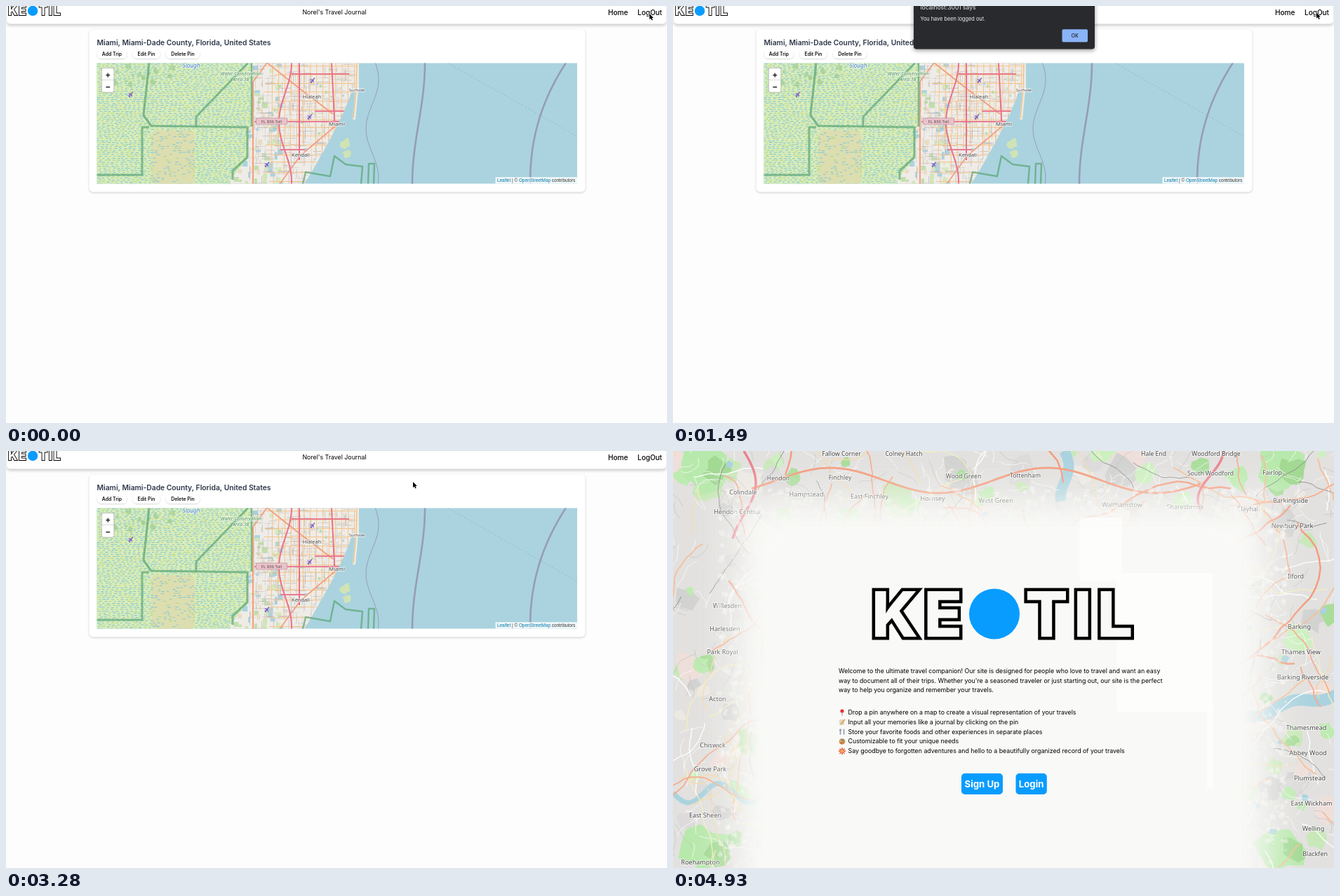
Recreate the animation shown at these times as an HTML page with a canvas. Size 942 by 595 pixels, loop 5.68 s.

```html
<!DOCTYPE html>
<html lang="en">
<head>
<meta charset="utf-8">
<title>Travel journal</title>
<style>
  html, body { margin: 0; width: 100%; height: 100%; overflow: hidden; background: #fdfdfd; }
  canvas { display: block; width: 942px; height: 595px; }
</style>
</head>
<body>
<canvas id="stage" width="942" height="595"></canvas>
<script>
const W = 942, H = 595, LOOP = 5680, STEP = 150;
const UI = 'Inter, sans-serif', MAP = '"Noto Sans", sans-serif';
const PAPER = '#f9f9f7', BLUE = '#089cff', WATER = '#aad3df';
const stage = document.getElementById('stage').getContext('2d');

function seeded(seed) {
  return () => {
    seed = (seed + 0x6d2b79f5) | 0;
    let t = Math.imul(seed ^ (seed >>> 15), 1 | seed);
    t = (t + Math.imul(t ^ (t >>> 7), 61 | t)) ^ t;
    return ((t ^ (t >>> 14)) >>> 0) / 4294967296;
  };
}

function repeat(n, draw) {
  for (let i = 0; i < n; i++) draw(i);
}

function layer(draw) {
  const c = document.createElement('canvas');
  c.width = W;
  c.height = H;
  draw(c.getContext('2d'));
  return c;
}

function text(g, str, x, y, font, color = '#000', align = 'left') {
  g.font = font;
  g.fillStyle = color;
  g.textAlign = align;
  g.fillText(str, x, y);
}

function label(g, str, x, y, size, color = '#444', style = '') {
  g.font = `${style} ${size}px ${MAP}`;
  g.textAlign = 'center';
  g.lineJoin = 'round';
  g.lineWidth = 2;
  g.strokeStyle = 'rgba(255,255,255,.65)';
  g.strokeText(str, x, y);
  text(g, str, x, y, g.font, color, 'center');
}

function box(g, x, y, w, h, r, fill) {
  g.beginPath();
  g.roundRect(x, y, w, h, r);
  g.fillStyle = fill;
  g.fill();
}

function shadowBox(g, blur, dy, alpha, ...shape) {
  g.save();
  g.shadowBlur = blur;
  g.shadowOffsetY = dy;
  g.shadowColor = `rgba(0,0,0,${alpha})`;
  box(g, ...shape);
  g.restore();
}

function trace(g, points) {
  g.beginPath();
  for (const [x, y] of points) g.lineTo(x, y);
}

function line(g, color, width, points) {
  trace(g, points);
  g.lineJoin = 'round';
  g.strokeStyle = color;
  g.lineWidth = width;
  g.stroke();
}

function area(g, color, points) {
  trace(g, points);
  g.fillStyle = color;
  g.fill();
}

function sample(n, point) {
  return Array.from({ length: n + 1 }, (_, i) => point(i / n));
}

// Points running down the stage, with x given as a function of y.
function downward(y0, y1, xAt) {
  return sample(40, u => {
    const y = y0 + (y1 - y0) * u;
    return [xAt(y), y];
  });
}

function disc(g, x, y, r, color) {
  g.beginPath();
  g.arc(x, y, r, 0, 7);
  g.fillStyle = color;
  g.fill();
}

function blob(g, rnd, x, y, r, color) {
  area(g, color, sample(10, u => {
    const a = u * 5.7, d = r * (0.6 + rnd() * 0.6);
    return [x + Math.cos(a) * d, y + Math.sin(a) * d];
  }));
}

function brand(g, x, y, scale, paper) {
  g.save();
  g.translate(x, y);
  g.scale(scale, scale);
  g.font = '800 90px ' + UI;
  g.letterSpacing = '8px';
  g.lineWidth = 9;
  g.strokeStyle = '#000';
  g.fillStyle = paper;
  for (const [part, left] of [['KE', -2], ['TIL', 217]]) {
    g.strokeText(part, left, -4.5);
    g.fillText(part, left, -4.5);
  }
  disc(g, 173, -37, 36, BLUE);
  g.restore();
}

function plane(g, x, y) {
  g.save();
  g.translate(x, y);
  g.rotate(0.7);
  g.fillStyle = '#8461c4';
  g.fillRect(-0.7, -4.5, 1.4, 9);
  area(g, '#8461c4', [[0, -1.5], [4, 1.5], [-4, 1.5]]);
  g.fillRect(-1.8, 3, 3.6, 1);
  g.restore();
}

function wetland(g, rnd) {
  g.fillStyle = '#daecb6';
  g.fillRect(129, 81, 243, 173);
  box(g, 207, 177, 62, 78, 8, '#dcdeb0');
  for (let y = 82; y < 254; y += 2.8) {
    for (let x = 129 + rnd() * 5; x < 352; x += 5 + rnd() * 3) {
      const dry = x > 207 && x < 269 && y > 177;
      if (dry && rnd() < 0.55) continue;
      g.fillStyle = rnd() < 0.8 ? '#7fc5d6' : '#aad588';
      g.fillRect(x, y + rnd(), 2.5 + rnd() * 2.5, 1);
    }
  }
  repeat(18, () => blob(g, rnd, 130 + rnd() * 120, 82 + rnd() * 30, 2 + rnd() * 3, 'rgba(158,204,142,.6)'));
}

const eastCoast = y => y < 122 ? 503 : 492 - 67 * ((y - 122) / 132) ** 1.2;
const westEdge = y => y < 172 ? 351 : 345 - Math.max(0, y - 216) * 0.8;

function city(g, rnd) {
  const speckle = (n, x, w, colors, size) => repeat(n, i => {
    g.fillStyle = colors[i % colors.length];
    g.fillRect(x + rnd() * w, 82 + rnd() * 170, size * (0.4 + rnd()), size * (0.4 + rnd()));
  });
  g.save();
  trace(g, [...downward(81, 254, eastCoast), ...downward(254, 81, westEdge)]);
  g.clip();
  g.fillStyle = '#efece8';
  g.fillRect(320, 81, 190, 173);
  speckle(90, 322, 50, ['#cfe6b5', '#e8ddc4', '#c2dfab', WATER], 6);
  speckle(40, 372, 16, [WATER, '#d9e8bd'], 6);
  repeat(420, i => {
    const x = 345 + rnd() * 153, y = 81 + rnd() * 173, length = 5 + rnd() * 18;
    g.fillStyle = i % 3 ? '#cdc8c6' : '#b5b1b0';
    if (i % 2) g.fillRect(x, y, length, 0.6);
    else g.fillRect(x, y, 0.6, length);
  });
  repeat(14, i => {
    const y = 85 + i * 12.5 + rnd() * 3, x = 380 + i * 9;
    line(g, '#f5c488', 1, [[367 + rnd() * 18, y], [500, y]]);
    line(g, '#f5c488', 1, [[x, 81], [x - 2, 170 + rnd() * 84]]);
  });
  speckle(40, 385, 105, ['#b7dca5', WATER], 3);

  const pink = '#e8718d', salmon = '#f2a17f';
  line(g, salmon, 2.2, downward(108, 254, () => 352));
  line(g, salmon, 2, [[372, 81], [420, 119], [466, 154]]);
  line(g, salmon, 2, [[372, 81], [352, 108]]);
  line(g, salmon, 1.8, [[471, 170], [420, 213], [390, 254]]);
  line(g, pink, 2, downward(81, 254, y => 398 + 9 * Math.cos((y - 81) / 27)));
  line(g, pink, 2, downward(81, 220, () => 418));
  line(g, pink, 2, downward(81, 165, y => 464 + (y - 81) / 20));
  for (const [x, y, width] of [[354, 165, 135], [407, 97, 82], [440, 150, 55], [391, 205, 35]]) {
    g.fillStyle = pink;
    g.fillRect(x, y - 0.9, width, 1.8);
  }
  g.restore();
  line(g, '#eeeadd', 4, [[501, 81], [500, 120], [496, 162]]);
  line(g, '#f3b878', 1.1, [[500, 81], [499, 120], [495, 160]]);
  blob(g, rnd, 484, 196, 8, '#cfe3b5');
  blob(g, rnd, 486, 211, 6, '#cfe3b5');
}

function seaLines(g) {
  const limit = '#979bb9';
  line(g, limit, 1, downward(81, 254, y => 522 + 9 * Math.cos((y - 105) / 22.3)));
  line(g, limit, 2.6, downward(81, 254, y => 588 + 9 * Math.cos((y - 81) / 55)));
  line(g, limit, 2.6, downward(81, 254, y => 747 + 51 * ((254 - y) / 173) ** 2.2));
  g.setLineDash([3, 2.5]);
  line(g, '#91b7d1', 0.8, [[629, 81], [814, 186]]);
  g.setLineDash([]);
}

function parkBorders(g) {
  const park = 'rgba(91,166,117,.7)';
  line(g, park, 3.2, [[204, 81], [196, 156], [207, 171], [344, 173], [344, 216], [323, 235], [323, 248]]);
  line(g, park, 3, [[129, 241], [194, 241], [194, 173], [204, 173]]);
  line(g, park, 2.8, [[345, 81], [271, 158], [271, 172]]);
  line(g, park, 2.5, [[350, 81], [350, 172]]);
  line(g, park, 2.5, [[423, 254], [427, 237], [462, 243], [468, 214], [484, 226], [508, 229], [506, 254]]);
  line(g, park, 2.5, [[516, 254], [517, 225], [525, 225], [524, 254]]);
}

function mapControls(g) {
  box(g, 136, 88, 18.2, 35.4, 2.3, '#a8aca8');
  box(g, 136.7, 88.7, 16.8, 34, 1.8, '#fff');
  g.fillStyle = '#ccc';
  g.fillRect(137, 105.2, 16.5, 0.7);
  text(g, '+', 145.2, 102.2, '600 12px ' + UI, '#111', 'center');
  text(g, '−', 145.2, 119.4, '600 12px ' + UI, '#111', 'center');

  g.fillStyle = 'rgba(255,255,255,.82)';
  g.fillRect(697.5, 244.2, 117, 10);
  let x = 700;
  for (const [part, color] of [['Leaflet', '#0078a8'], [' | © ', '#444'],
    ['OpenStreetMap', '#0078a8'], [' contributors', '#333']]) {
    text(g, part, x, 251.3, '6.4px "Liberation Sans", sans-serif', color);
    x += g.measureText(part).width;
  }
}

function miamiMap(g) {
  const rnd = seeded(21);
  g.save();
  g.beginPath();
  g.rect(129.5, 81.5, 684.5, 172);
  g.clip();
  g.fillStyle = WATER;
  g.fillRect(129, 81, 686, 174);
  wetland(g, rnd);
  city(g, rnd);
  parkBorders(g);
  seaLines(g);
  for (const [x, y] of [[178, 126], [437, 106], [433, 158], [372, 226]]) plane(g, x, y);
  box(g, 356, 159.7, 45, 9.6, 1.3, '#b88391');
  box(g, 356.6, 160.3, 43.8, 8.4, 1, '#e9c3ca');
  text(g, 'FL 836 Toll', 378.5, 166.7, '6px ' + MAP, '#5b3f48', 'center');
  label(g, 'Slough', 264, 88, 8.1, '#417fc1', 'italic');
  label(g, 'Water Conservation', 335, 99, 6.7, '#438943', 'italic');
  label(g, 'Area 3B', 335, 107, 6.7, '#438943', 'italic');
  label(g, 'Hialeah', 436, 131.5, 7.4);
  label(g, 'Miami', 471.5, 170.5, 7.9);
  label(g, 'Kendall', 420, 214.5, 7.4);
  label(g, 'Surfside', 500, 121.5, 5.8);
  mapControls(g);
  g.restore();
}

const journal = layer(g => {
  g.fillStyle = '#fdfdfd';
  g.fillRect(0, 0, W, H);
  shadowBox(g, 4, 2.5, 0.2, 1, -10, 940, 35.5, 5, '#fff');
  brand(g, 3.5, 14.3, 0.2, '#fff');
  text(g, "Norel's Travel Journal", 468, 12.4, '8.8px ' + UI, '#000', 'center');
  text(g, 'Home', 858, 12.8, '500 10.1px ' + UI);
  text(g, 'LogOut', 900, 12.8, '500 10px ' + UI);

  shadowBox(g, 3, 1, 0.2, 118.5, 33.5, 707, 232, 6, '#fff');
  text(g, 'Miami, Miami-Dade County, Florida, United States', 129.5, 56, '600 10.3px ' + UI, '#2d3748');
  for (const [name, x, w] of [['Add Trip', 129.5, 43], ['Edit Pin', 180, 40], ['Delete Pin', 227.5, 49]]) {
    shadowBox(g, 1.5, 0.6, 0.2, x, 62.3, w, 13, 6.5, '#fff');
    text(g, name, x + w / 2, 71.3, '600 6.9px ' + UI, '#111', 'center');
  }
  miamiMap(g);
});

const dialog = layer(g => {
  shadowBox(g, 6, 2, 0.4, 343, -10, 258, 71.5, 4, '#292a2d');
  text(g, 'localhost:3001 says', 352.5, 4.6, '8.5px ' + UI, '#e8eaed');
  text(g, 'You have been logged out.', 352.5, 21.4, '7.35px ' + UI, '#f1f2f4');
  box(g, 554.5, 33.3, 36.5, 18.2, 2, '#8ab4f8');
  text(g, 'OK', 572.7, 45, '500 7px ' + UI, '#202124', 'center');
});

// A road that wanders away from a random start.
function wander(g, rnd, color, width, length) {
  let x = rnd() * W, y = rnd() * H, a = rnd() * 6.3;
  line(g, color, width, sample(16, () => {
    a += (rnd() - 0.5) * 0.7;
    return [x += Math.cos(a) * length / 16, y += Math.sin(a) * length / 16];
  }));
}

function londonMap(g) {
  const rnd = seeded(77);
  const scatter = (n, size, colors) => repeat(n, i =>
    blob(g, rnd, rnd() * W, rnd() * H, size * (0.4 + rnd()), colors[i % colors.length]));
  const roads = (n, width, length, colors) => repeat(n, i =>
    wander(g, rnd, colors[i % colors.length], width, length * (0.5 + rnd())));

  g.fillStyle = '#e2e1df';
  g.fillRect(0, 0, W, H);
  scatter(160, 18, ['#d2d2d1', '#ece8e3', '#c9e8b9', '#dcdada', '#efdfdb']);
  scatter(90, 15, ['#bdebb0', '#a9dd9a', '#cdf0c0']);
  for (const x of [45, 865]) {
    for (const y of [28, 570]) {
      blob(g, rnd, x, y, 38, '#b8e9ac');
      blob(g, rnd, x + 18, y, 20, '#a2d993');
    }
  }
  scatter(30, 5, [WATER]);
  line(g, WATER, 15, downward(0, 72, y => 558 + 6 * Math.sin(y / 14)));
  line(g, WATER, 17, sample(20, u => [815 + 130 * u, 378 - 32 * u + 5 * Math.sin(u * 9)]));
  line(g, WATER, 7, sample(20, u => [125 * u, 488 + 14 * Math.sin(u * 9)]));

  roads(650, 0.7, 35, ['#fff', '#fff', '#c4c2c0']);
  roads(120, 1.3, 110, ['#f6dba8', '#f6efbc', '#fff']);
  roads(45, 0.9, 110, ['#8c8c8c']);
  roads(60, 1.7, 130, ['#f8bd95', '#f7ab8b']);
  roads(16, 2.4, 190, ['#f39b7c']);
  line(g, '#f39b7c', 2.8, sample(60, u => [112 + 640 * u, 42 + 18 * Math.cos((u - 0.9) * 13)]));
  line(g, '#e9828c', 3.4, downward(0, 125, y => 101 + 17 * Math.sin(y / 29)));
  line(g, '#e9828c', 3.4, downward(0, 85, y => 766 + 18 * Math.cos(y / 22)));
}

// Names set out evenly along a line; empty slots stay blank.
function places(g, names, x, y, dx, dy, size = 8.6) {
  names.split('|').forEach((name, i) => label(g, name, x + i * dx, y + i * dy, size));
}

function placeNames(g) {
  places(g, 'Fallow Corner|Colney Hatch||||Hale End|Woodford Bridge', 240, 7, 89, 0);
  places(g, 'Hendon|Finchley||Wood Green|Tottenham|||South Woodford|Fairlop', 150, 42, 88, -1);
  places(g, 'Colindale|Hampstead|East Finchley|Hornsey|West Green||Walthamstow|Sharesbrook|Clayhall',
    100, 62, 90, 3, 9);
  places(g, '|Hendon Central||||Willesden|Harlesden|Park Royal||Acton||Chiswick|Grove Park||East Sheen||Roehampton',
    95, 57, -3.5, 33.3, 9);
  places(g, 'Barkingside|Newbury Park||Ilford||Barking|Thames View|Barking Riverside||Thamesmead|Abbey Wood' +
    '|Plumstead|East Wickham|Welling|Blackfen', 880, 74, 2.5, 36, 9);
}

function centreBox(g, inset, blur, color) {
  g.save();
  g.filter = `blur(${blur}px)`;
  box(g, 100 + inset, 80 + inset, 738 - 2 * inset, H, 45, color);
  g.restore();
}

function fadeCentre(g) {
  const rnd = seeded(5);
  centreBox(g, -35, 22, 'rgba(249,249,247,.4)');
  centreBox(g, 2, 17, PAPER);
  centreBox(g, 30, 4, PAPER);
  repeat(700, i => {
    const along = rnd(), depth = rnd() * 60, r = 1 + rnd() * 4;
    const [x, y] = [[75 + along * 790, 55 + depth], [65 + depth, 70 + along * H],
      [875 - depth, 70 + along * H]][i % 3];
    blob(g, rnd, x, y, r, 'rgba(249,249,247,.45)');
  });
}

function bulletIcon(g, kind, x, y) {
  const bar = (color, width, ...points) => line(g, color, width, points);
  const icons = [
    () => {
      bar('#999', 1, [x, y], [x, y + 5]);
      disc(g, x, y - 2.2, 2.6, '#e5303a');
    },
    () => {
      box(g, x - 4, y - 4, 7, 8, 1, '#ddd8cd');
      bar('#e39b32', 1.6, [x - 2, y + 3], [x + 4, y - 4]);
    },
    () => {
      for (const dx of [-2.5, 2.5]) bar('#8997a6', 1.5, [x + dx, y - 4], [x + dx, y + 4]);
      disc(g, x - 2.5, y - 2.5, 1.4, '#8997a6');
    },
    () => {
      disc(g, x, y, 4.3, '#c98b4e');
      ['#e54545', '#f4d54a', '#44a5d8', '#55ad5b'].forEach((color, i) =>
        disc(g, x + 2.4 * Math.cos(i * 1.3 + 2), y + 2.4 * Math.sin(i * 1.3 + 2), 1, color));
    },
    () => {
      repeat(8, i => {
        const a = i * Math.PI / 4;
        bar('#e6492f', 1.5, [x, y], [x + 5 * Math.cos(a), y + 5 * Math.sin(a)]);
      });
      disc(g, x, y, 2, '#f8b54a');
    }
  ];
  icons[kind]();
}

const backdrop = layer(g => {
  londonMap(g);
  placeNames(g);
  fadeCentre(g);
});

const welcome = layer(g => {
  const body = '8.8px ' + UI, lineHeight = 13.75;
  brand(g, 285, 269.5, 1, PAPER);
  ['Welcome to the ultimate travel companion! Our site is designed for people who love to travel and want an easy',
    "way to document all of their trips. Whether you're a seasoned traveler or just starting out, our site is the perfect",
    'way to help you organize and remember your travels.'
  ].forEach((row, i) => text(g, row, 236, 316.8 + i * lineHeight, body));
  ['Drop a pin anywhere on a map to create a visual representation of your travels',
    'Input all your memories like a journal by clicking on the pin',
    'Store your favorite foods and other experiences in separate places',
    'Customizable to fit your unique needs',
    'Say goodbye to forgotten adventures and hello to a beautifully organized record of your travels'
  ].forEach((row, i) => {
    const y = 376.2 + i * lineHeight;
    text(g, row, 249.5, y, body);
    bulletIcon(g, i, 241, y - 3);
  });
  for (const [name, x, w] of [['Sign Up', 411, 59], ['Login', 488.5, 44.3]]) {
    box(g, x, 460, w, 30, 5, BLUE);
    text(g, name, x + w / 2, 480, '700 13.2px ' + UI, '#fff', 'center');
  }
});

// The pointer jumps once per STEP along each journey.
const GLIDE = 1930, LEAVE = 4030;
const glide = [[897, 9], [778, 6], [721.5, 16], [707.5, 21], [629.5, 37], [605.5, 44], [589.5, 44], [580, 44]];
const leave = [[580.5, 47], [633, 175], [762, 362], [809, 472], [856, 523], [941, 594], [W + 20, H + 20]];

function stepOf(t, start, path) {
  return Math.min(path.length - 1, Math.floor((t - start) / STEP));
}

function pointerAt(t) {
  if (t >= LEAVE) return leave[stepOf(t, LEAVE, leave)];
  if (t >= GLIDE) return glide[stepOf(t, GLIDE, glide)];
  return [917, 11 - 1.5 * Math.min(1, t / 1190)];
}

function drawPointer(t) {
  stage.save();
  stage.translate(...pointerAt(t));
  const shape = [[0, 0], [0, 8.2], [1.9, 6.5], [3.3, 9.6], [4.7, 9], [3.4, 6], [5.8, 5.9], [0, 0]];
  line(stage, '#fff', 1.3, shape);
  area(stage, '#000', shape);
  stage.restore();
}

// Each jump across the blank centre leaves a paler block behind.
function drawTrail(t) {
  stage.save();
  stage.beginPath();
  stage.rect(130, 95, 640, H);
  stage.clip();
  stage.fillStyle = 'rgba(255,255,255,.65)';
  for (let i = 1; i <= stepOf(t, LEAVE, leave); i++) {
    const [x0, y0] = leave[i - 1], [x1, y1] = leave[i];
    stage.fillRect(x0 - 1, y0 - 1, x1 - x0 + 8, y1 - y0 + 11);
  }
  stage.restore();
}

function render(t) {
  if (t < 3430) {
    stage.drawImage(journal, 0, 0);
    if (t >= 1490 && t < 3280) {
      stage.globalAlpha = t < 3130 ? 1 : 0.5;
      stage.drawImage(dialog, 0, 0);
      stage.globalAlpha = 1;
    }
  } else {
    stage.drawImage(backdrop, 0, 0);
    drawTrail(t);
    stage.drawImage(welcome, 0, 0);
  }
  drawPointer(t);
}

const began = performance.now();
function tick() {
  render((performance.now() - began) % LOOP);
  requestAnimationFrame(tick);
}
tick();
</script>
</body>
</html>
```
